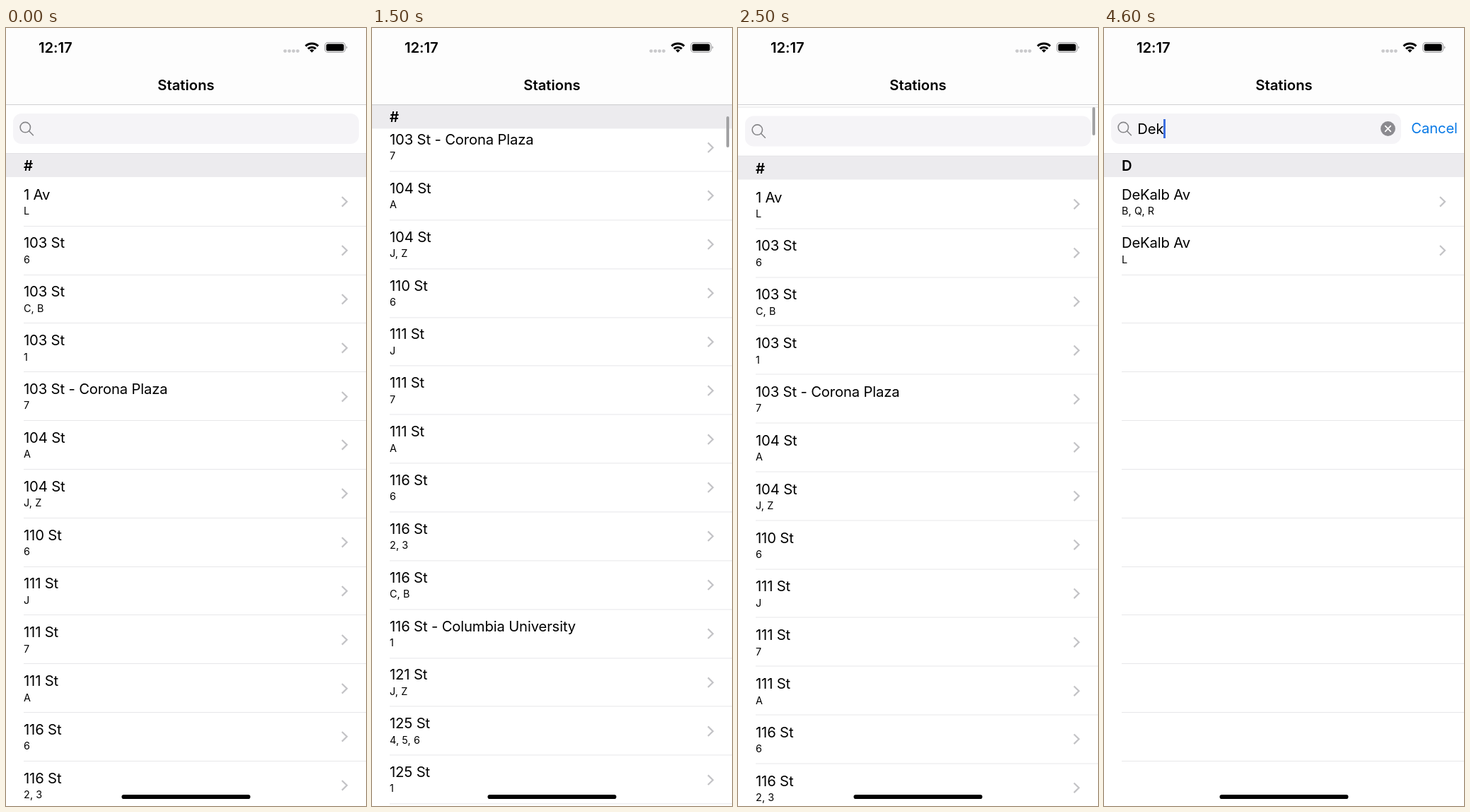
Animation, 509 px wide and 1101 px high, one loop 5.1 s. Source, as an HTML page:

```html
<!DOCTYPE html>
<html lang="en">
<head>
<meta charset="utf-8">
<title>Stations</title>
<style>
html, body { margin: 0; width: 100%; height: 100%; overflow: hidden; background: #fff; }
#stage { position: relative; width: 509px; height: 1101px; overflow: hidden; background: #fff;
  font: 400 20.3px/24px Inter, "Open Sans", sans-serif; letter-spacing: -.17px; color: #000; white-space: nowrap; }
#stage div, #stage svg { position: absolute; }
#nav { left: 0; top: 0; width: 509px; height: 108px; background: #fdfdfd; border-bottom: 1px solid #d0d0d2; }
#time { left: 46px; top: 16px; font-weight: 600; letter-spacing: -.05px; }
#title { left: 0; width: 509px; top: 69px; text-align: center; font-weight: 600; letter-spacing: 0; }
#table { left: 0; top: 108.2px; width: 509px; height: 1400px; }
#edge { left: 0; top: 0; width: 509px; height: 1px; background: #e4e4e6; }
#field { left: 10px; top: 12.6px; width: 489px; height: 43.6px; border-radius: 12px; background: #f5f4f7; }
#input { left: 37.3px; top: 8px; height: 27px; line-height: 27px; display: flex; }
#caret { width: 2.4px; height: 27px; background: #3d6fe0; }
#stage #caret { position: static; }
#clear { right: 8.5px; top: 11px; }
#cancel { left: 434.3px; top: 22px; color: #0a7ae6; }
.rows { left: 0; top: 0; width: 509px; }
.row { left: 25px; width: 484px; height: 68.85px; }
.row::after { content: ""; position: absolute; left: 0; right: 0; bottom: -.4px; height: 1px; background: #e7e7e9; }
.name { left: 0; top: 12.2px; }
.lines { left: 0; top: 38.6px; font-size: 14.4px; line-height: 18px; letter-spacing: .1px; }
.row svg { left: 448px; top: 25.7px; }
.head { left: 0; width: 484px; height: 34.4px; padding-left: 25px; background: #ecebee; font-weight: 600; line-height: 36px; box-shadow: inset 0 1px #e2e1e5; }
#bar { left: 501.3px; width: 4.2px; border-radius: 2.1px; background: #a2a2a4; }
#home { left: 0; top: 1080px; }
</style>
</head>
<body>
<div id="stage">
  <div id="table">
    <div id="edge"></div>
    <div id="field">
      <svg width="34" height="43" fill="none" stroke="#868689" stroke-width="1.6" stroke-linecap="round"><circle cx="17.3" cy="19.6" r="7.2"/><path d="M22.5 24.8L28.4 30.7"/></svg>
      <div id="input"><span id="typed"></span><div id="caret"></div></div>
      <svg id="clear" width="21" height="21"><circle cx="10.5" cy="10.5" r="10.4" fill="#8b8a8f"/><path d="M6.7 6.7l7.6 7.6m0-7.6l-7.6 7.6" stroke="#fff" stroke-width="1.7" stroke-linecap="round"/></svg>
    </div>
    <div id="cancel">Cancel</div>
    <div id="all" class="rows"></div>
    <div id="some" class="rows"></div>
    <div id="match" class="rows"></div>
  </div>
  <div id="bar"></div>
  <div id="nav">
    <div id="time">12:17</div>
    <svg width="509" height="54">
      <g fill="#c9c9cb"><circle cx="394.6" cy="32.6" r="2.4"/><circle cx="400.6" cy="32.6" r="2.4"/><circle cx="406.5" cy="32.6" r="2.4"/><circle cx="412.4" cy="32.6" r="2.4"/></g>
      <g fill="none" stroke="#000" stroke-width="3"><path d="M423.6 25.6a12.6 12.6 0 0 1 17.8 0"/><path d="M427 29.4a7.8 7.8 0 0 1 11 0"/></g>
      <path d="M429.4 31.6a4.4 4.4 0 0 1 6.2 0L432.5 34.8z"/>
      <rect x="450.9" y="20.6" width="28.6" height="13.8" rx="4.2" fill="none" stroke="#a6a6a8" stroke-width="1.2"/>
      <rect x="452.7" y="22.4" width="25" height="10.2" rx="2.6"/>
      <path d="M480.8 25.2q1.7.7 1.7 2.3t-1.7 2.3z" fill="#a6a6a8"/>
    </svg>
    <div id="title">Stations</div>
  </div>
  <svg id="home" width="509" height="21"><rect x="163.5" y="4.9" width="182" height="6.2" rx="3.1"/></svg>
</div>
<script>
const ROW = 68.85, HEAD = 34.4, LOOP = 5100;
const $ = id => document.getElementById(id);

const stations = `#
1 Av|L
103 St|6
103 St|C, B
103 St|1
103 St - Corona Plaza|7
104 St|A
104 St|J, Z
110 St|6
111 St|J
111 St|7
111 St|A
116 St|6
116 St|2, 3
116 St|C, B
116 St - Columbia University|1
121 St|J, Z
125 St|4, 5, 6
125 St|1
125 St|2, 3`;
const partial = `#
138 St - Grand Concourse|4, 5
149 St - Grand Concourse|2, 4, 5
61 St - Woodside|7
75 St - Elderts Ln|J, Z
A
Aqueduct - N Conduit Av|A
Astoria - Ditmars Blvd|N, W
Astoria Blvd|N, W
Avenue I|F
B
Bedford Av|L
Bedford - Nostrand Avs|G
Bedford Park Blvd|4
Bedford Park Blvd|B, D`;
const found = `D
DeKalb Av|B, Q, R
DeKalb Av|L` + "\n|".repeat(11);

const chevron = '<svg width="12" height="18" fill="none" stroke="#c3c3c6" stroke-width="2.2"><path d="M2 2l7 6.8-7 6.8"/></svg>';

function build(id, text) {
  let y = ROW, html = "";
  for (const item of text.split("\n")) {
    const [name, lines] = item.split("|");
    if (lines === undefined) {
      html += `<div class="head" style="top:${y}px">${name}</div>`;
      y += HEAD;
    } else {
      html += `<div class="row" style="top:${y}px"><div class="name">${name}</div><div class="lines">${lines}</div>${name && chevron}</div>`;
      y += ROW;
    }
  }
  $(id).innerHTML = html;
}
build("all", stations);
build("some", partial);
build("match", found);
const sticky = document.querySelector("#all .head");
sticky.style.zIndex = 1;

// Linear track through [time, value] points
function track(points, t) {
  let [t0, v0] = points[0];
  for (const [t1, v1] of points) {
    if (t < t1) return v0 + (v1 - v0) * Math.max(0, t - t0) / (t1 - t0 || 1);
    t0 = t1; v0 = v1;
  }
  return v0;
}
const scroll = [[600, 0], [700, 38], [800, 150], [900, 265], [1000, 325.4], [1100, 348], [1200, 356], [1400, 356],
  [1500, 352.6], [1600, 262], [1700, 110], [1800, -14], [1900, -4], [2000, -1.2], [2100, 0],
  [2200, 0], [2300, -16], [2400, -9], [2500, -3.5], [2600, -1.4], [2700, 0]];
const barFade = [[3800, 1], [4100, 0]];
const caretFade = [[2900, 0], [3000, 1], [3400, 1], [3500, .8], [3600, 0], [3800, 0], [3900, .5], [4000, 1]];
const cancelIn = [[3900, 0], [4200, 1]];
const show = (id, on) => $(id).style.display = on ? "" : "none";

function draw(now) {
  // The screen refreshes ten times a second
  const t = Math.floor(now % LOOP / 100) * 100;
  const s = track(scroll, t), k = track(cancelIn, t);

  $("table").style.transform = `translateY(${-s}px)`;
  sticky.style.top = Math.max(ROW, s) + "px";
  show("edge", s < 0);

  $("bar").style.top = 111.6 + Math.max(0, s) * .037 + "px";
  $("bar").style.height = 44.4 + Math.min(0, s) + "px";
  $("bar").style.opacity = t < 700 ? 0 : track(barFade, t);

  $("field").style.width = 489 - 79 * k + "px";
  $("cancel").style.opacity = k;
  $("cancel").style.transform = `translateX(${(1 - k) * 75}px)`;
  $("typed").textContent = t < 4200 ? "" : t < 4400 ? "D" : t < 4600 ? "De" : "Dek";
  $("caret").style.opacity = track(caretFade, t);
  show("clear", t >= 4200);

  show("all", t < 4400);
  show("some", t >= 4400 && t < 4600);
  show("match", t >= 4600);
  requestAnimationFrame(tick);
}
let start;
function tick(now) {
  start ??= now;
  draw(now - start);
}
draw(0);
</script>
</body>
</html>
```
